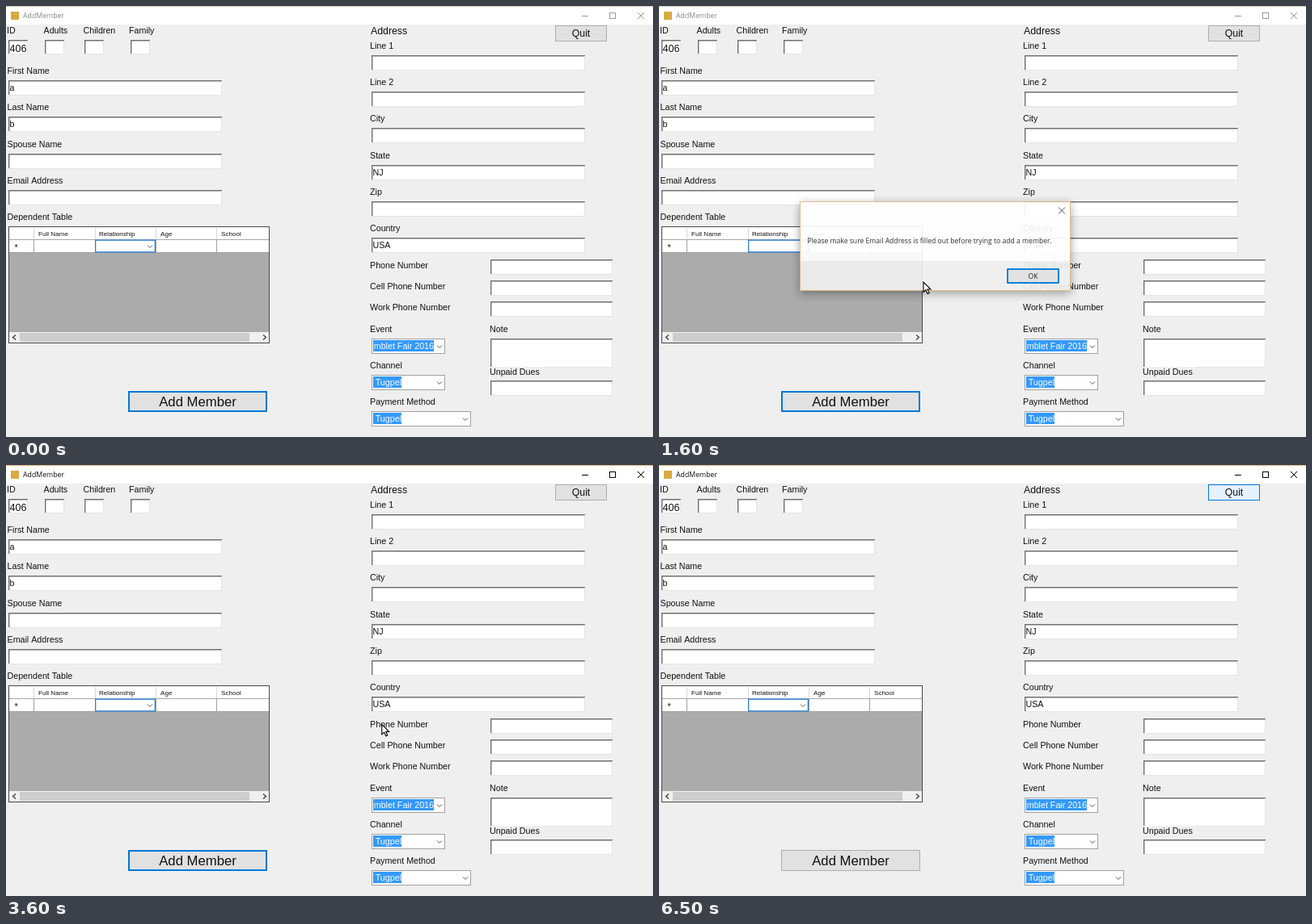
Write an HTML page with a canvas that moves like this. It is 800 px wide and 534 px high and loops after 7100 ms.

```html
<!DOCTYPE html>
<html lang="en">
<head>
<meta charset="utf-8">
<title>AddMember</title>
<style>
html, body { margin: 0; width: 100%; height: 100%; overflow: hidden; background: #efefef; }
canvas { display: block; }
</style>
</head>
<body>
<canvas id="stage" width="800" height="534"></canvas>
<script>
const W = 800, H = 534, LOOP = 7100, STEP = 100;
const stage = document.getElementById('stage').getContext('2d');
const layer = document.createElement('canvas');
layer.width = W;
layer.height = H;
const layerCtx = layer.getContext('2d');
let ctx = stage;

const FORM = '"Liberation Sans", Arial, sans-serif';
const SYSTEM = '"Open Sans", "Noto Sans", sans-serif';
const BLUE = '#0078d7', FACE = '#efefef', HOVER = '#e5f1fb';

// Keys: [time, x, y] and [time, value]
const POINTER = [[200, 322, 467], [900, 322, 467], [1200, 327, 342], [1700, 327, 342],
  [2300, 451, 338], [3500, 451, 338], [4200, 699, 37], [4500, 699, 37],
  [5000, 515, 344], [5200, 515, 344], [5600, 530, 536]];
const WARN_FADE = [[400, 0], [500, 0.45], [600, 0.82], [700, 0.95], [800, 1], [1200, 1], [1400, 0]];
const INFO_FADE = [[1300, 0], [1400, 0.35], [1500, 0.75], [1600, 0.92], [1700, 1],
  [2800, 1], [2900, 0.85], [3000, 0.55], [3100, 0.2], [3200, 0]];

function sample(keys, t, ease = k => k) {
  if (t <= keys[0][0]) return keys[0].slice(1);
  for (let i = 1; i < keys.length; i++) {
    const a = keys[i - 1], b = keys[i];
    if (t <= b[0]) {
      const k = ease((t - a[0]) / (b[0] - a[0]));
      return a.slice(1).map((v, j) => v + (b[j + 1] - v) * k);
    }
  }
  return keys[keys.length - 1].slice(1);
}
const smooth = k => k * k * (3 - 2 * k);

function box(x, y, w, h, fill) {
  ctx.fillStyle = fill;
  ctx.fillRect(x, y, w, h);
}
function frame(x, y, w, h, color, size = 1) {
  ctx.strokeStyle = color;
  ctx.lineWidth = size;
  ctx.strokeRect(x + size / 2, y + size / 2, w - size, h - size);
}
function text(s, x, y, size = 10.7, color = '#111', font = FORM, align = 'left') {
  ctx.font = size + 'px ' + font;
  ctx.textAlign = align;
  ctx.fillStyle = color;
  ctx.fillText(s, x, y);
}
function line(points, color, size = 1) {
  ctx.strokeStyle = color;
  ctx.lineWidth = size;
  ctx.beginPath();
  points.forEach(([x, y]) => ctx.lineTo(x, y));
  ctx.stroke();
}
function cross(x, y, r, color) {
  line([[x - r, y - r], [x + r, y + r]], color);
  line([[x - r, y + r], [x + r, y - r]], color);
}
function chevron(x, y) {
  line([[x - 3, y - 1.5], [x, y + 1.5], [x + 3, y - 1.5]], '#555');
}
function field(x, y, w, h = 19, value = '', size = 10.7) {
  box(x, y, w, h, '#fff');
  box(x, y + h - 1, w, 1, '#e4e4e4');
  box(x + w - 1, y, 1, h, '#e4e4e4');
  box(x, y, w, 1, '#707070');
  box(x, y + 1, w - 1, 0.5, '#707070');
  box(x, y, 1, h - 1, '#707070');
  box(x + 1, y, 0.4, h - 1, '#707070');
  if (value) text(value, x + 1.5, y + (size > 11 ? 14.5 : 12.5), size);
}
function combo(x, y, w, value, mark) {
  box(x, y, w, 19, '#fff');
  frame(x, y, w, 19, '#a0a0a0');
  box(x + 2, y + 2, mark, 14, '#3399ff');
  text(value, x + 2 + mark, y + 13, 10.7, '#fff', FORM, 'right');
  chevron(x + w - 7, y + 10);
}
function button(label, x, y, w, h, size, font, state = '') {
  box(x, y, w, h, state === 'hover' ? HOVER : '#e1e1e1');
  frame(x, y, w, h, state ? BLUE : '#adadad', state === 'focus' ? 2 : 1);
  text(label, x + w / 2, y + h / 2 + size * 0.36, size, '#111', font, 'center');
}

function titleBar(active) {
  const ink = active ? '#000' : '#999';
  box(0, 0, W, 23, '#fff');
  box(0, 0, W, 1, active ? '#dcb173' : '#d0c8bd');
  box(6, 7, 10, 10, '#d8aa40');
  text('AddMember', 21, 15, 8.75, active ? '#111' : '#888', SYSTEM);
  box(712, 12, 8, 1, ink);
  frame(746, 8, 8, 8, ink);
  cross(785, 12, 4, ink);
}

function grid() {
  box(3, 273, 323, 145, '#ababab');
  box(4, 274, 321, 32, '#fff');
  box(4, 289, 321, 1, '#a8a8a8');
  box(4, 305, 321, 1, '#a0a0a0');
  for (const x of [34, 110, 185, 260]) {
    box(x, 275, 1, 14, '#d8d8d8');
    box(x, 290, 1, 15, '#a0a0a0');
  }
  [['Full Name', 40], ['Relationship', 115], ['Age', 191], ['School', 266]]
    .forEach(([s, x]) => text(s, x, 285, 8.1));
  text('*', 10.5, 303, 11);
  frame(110, 289.5, 75, 16, '#2b7fd0', 1.3);
  chevron(178, 298);
  box(4, 404, 321, 13, '#f0f0f0');
  box(17, 405, 284, 11, '#cdcdcd');
  line([[12, 407.5], [8.5, 410.5], [12, 413.5]], '#333', 1.2);
  line([[318, 407.5], [321.5, 410.5], [318, 413.5]], '#333', 1.2);
  frame(3, 273, 323, 145, '#484848');
}

function form(addState, quitState) {
  box(0, 23, W, H - 23, FACE);

  [['ID', 1, 3], ['Adults', 46.5, 48], ['Children', 95.5, 97], ['Family', 152, 154]]
    .forEach(([s, lx, fx]) => {
      text(s, lx, 34);
      field(fx, 42, 24, 18, s === 'ID' ? '406' : '', 12.6);
    });
  ['First Name', 'Last Name', 'Spouse Name', 'Email Address', 'Dependent Table'].forEach((s, i) => {
    const y = Math.round(92 + i * 45.3);
    text(s, 1.5, y - 8);
    if (i < 4) field(3, y, 264, 19, ['a', 'b'][i]);
  });
  grid();
  button('Add Member', 151, 477, 172, 26, 16.7, FORM, addState);

  text('Address', 451, 35, 12.3);
  button('Quit', 679, 24, 64, 20, 12.3, FORM, quitState);
  ['Line 1', 'Line 2', 'City', 'State', 'Zip', 'Country'].forEach((s, i) => {
    const y = Math.round(61 + i * 45.2);
    text(s, 450, y - 8);
    field(452, y, 264, 19, { State: 'NJ', Country: 'USA' }[s]);
  });
  ['Phone Number', 'Cell Phone Number', 'Work Phone Number'].forEach((s, i) => {
    const y = Math.round(314 + i * 26.2);
    text(s, 450, y + 11);
    field(599, y, 151);
  });

  text('Event', 450, 404);
  combo(452, 412, 91, 'mblet Fair 2016', 75);
  text('Channel', 450, 449);
  combo(452, 457, 91, 'Tugpel', 35);
  text('Payment Method', 450, 494);
  combo(452, 502, 123, 'Tugpel', 35);

  text('Note', 598, 404);
  field(599, 412, 151, 36);
  box(598, 447, 66, 12, FACE);
  text('Unpaid Dues', 598, 457);
  field(599, 464, 151);
}

function panel(x, y, w, h, split) {
  ctx.save();
  ctx.shadowColor = 'rgba(0,0,0,0.38)';
  ctx.shadowBlur = 11;
  ctx.shadowOffsetY = 3;
  box(x, y, w, h, '#fff');
  ctx.restore();
  box(x, split, w, y + h - split, '#f0f0f0');
  frame(x, y, w, h, '#e0b980');
}

function warning(hover) {
  panel(237, 236, 209, 124, 323);
  text('Critical Warning', 243.5, 251.5, 8.6, '#222', SYSTEM);
  cross(434, 247, 4, '#c4c4c4');
  ctx.fillStyle = '#fbd116';
  ctx.strokeStyle = '#dfb010';
  ctx.lineWidth = 1;
  ctx.lineJoin = 'round';
  ctx.beginPath();
  ctx.moveTo(268, 279.5);
  ctx.lineTo(280, 302.5);
  ctx.lineTo(256.5, 302.5);
  ctx.closePath();
  ctx.fill();
  ctx.stroke();
  box(267, 287, 2.4, 8.5, '#111');
  box(267, 297.5, 2.4, 2.5, '#111');
  text('Are you sure you wish continue?', 288, 294, 8.6, '#222', SYSTEM);
  button('Yes', 293, 332, 65, 19, 8.6, SYSTEM, hover ? 'hover' : 'focus');
  button('No', 365, 332, 66, 19, 8.6, SYSTEM);
}

function notice(hover) {
  panel(174, 242, 335, 111, 316);
  cross(498, 253.5, 4, '#444');
  text('Please make sure Email Address is filled out before trying to add a member.',
    183.5, 294, 8.6, '#222', SYSTEM);
  button('OK', 430, 325, 65, 19, 8.6, SYSTEM, hover ? 'hover' : 'focus');
}

function fade(paint, alpha, scale, cx, cy) {
  if (alpha <= 0) return;
  ctx = layerCtx;
  ctx.clearRect(0, 0, W, H);
  paint();
  ctx = stage;
  ctx.save();
  ctx.globalAlpha = alpha;
  if (scale !== 1) {
    ctx.translate(cx, cy);
    ctx.scale(scale, scale);
    ctx.translate(-cx, -cy);
  }
  ctx.drawImage(layer, 0, 0);
  ctx.restore();
}

function arrow(x, y) {
  const shape = [[0, 0], [0, 12.5], [2.9, 9.8], [5, 14.5], [7, 13.6], [5, 9], [8.9, 9]];
  ctx.beginPath();
  shape.forEach(([dx, dy]) => ctx.lineTo(x + dx, y + dy));
  ctx.closePath();
  ctx.lineJoin = 'miter';
  ctx.lineWidth = 1.1;
  ctx.fillStyle = '#fff';
  ctx.strokeStyle = '#000';
  ctx.fill();
  ctx.stroke();
}

function draw(t) {
  const [x, y] = sample(POINTER, t, smooth);
  const over = (l, top, w, h) => x >= l && x <= l + w && y >= top && y <= top + h;
  const left = t >= 4500;
  const quitLit = left || over(679, 24, 64, 20);

  titleBar(t >= 2900);
  form(left ? '' : 'focus', quitLit ? 'hover' : '');

  const [warn] = sample(WARN_FADE, t);
  fade(() => warning(over(293, 332, 65, 19)), warn, t > 1200 ? 0.97 + 0.03 * warn : 1, 341.5, 298);
  const [info] = sample(INFO_FADE, t);
  fade(() => notice(over(430, 325, 65, 19)), info, t > 2800 ? 0.974 + 0.026 * info : 1, 341.5, 297.5);

  if (t >= 200 && t < 5600) arrow(x, y);
}

function tick() {
  const t = performance.now() % LOOP;
  draw(Math.floor(t / STEP) * STEP);
  requestAnimationFrame(tick);
}
tick();
</script>
</body>
</html>
```
